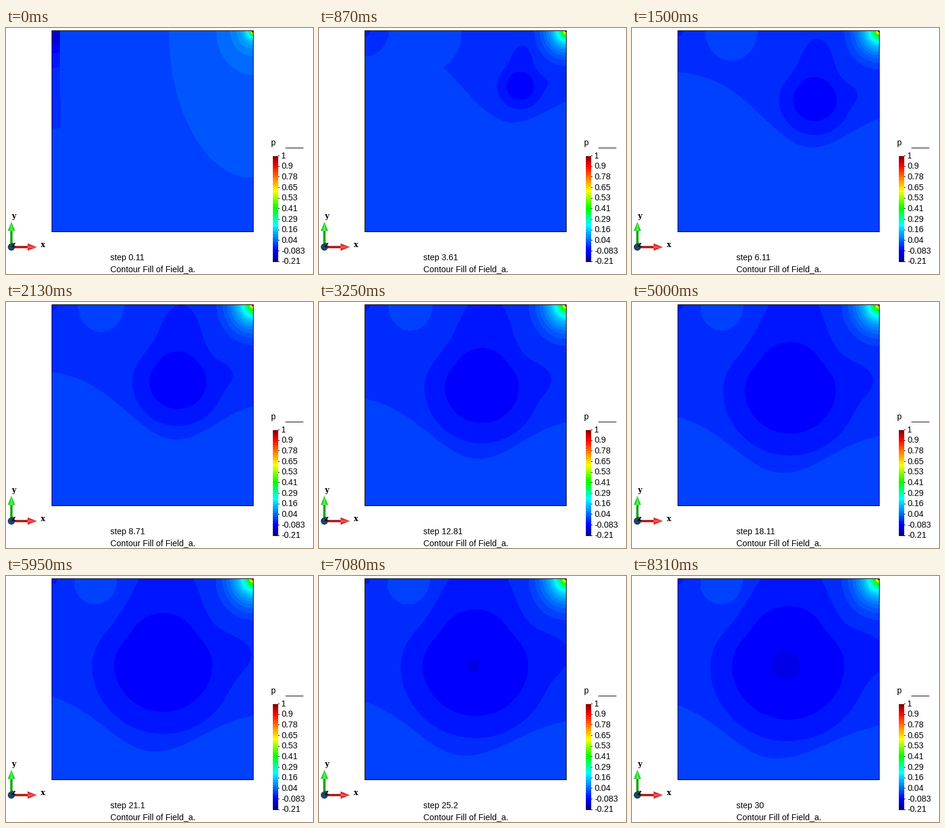
Animation of 512x411 px, one loop 8380 ms. Source, as a matplotlib script:

```python
import numpy as np
import matplotlib.pyplot as plt
from matplotlib.animation import FuncAnimation
from matplotlib.collections import PolyCollection
from matplotlib.patches import Circle, Polygon, Rectangle

W, H, DPI = 512, 411, 100
LOOP, TICK = 8380, 20
X0, Y0, X1, Y1 = 77, 5, 412, 340
BANDS, REST = 50, 8
PX = 72 / DPI

# palette: navy, blue, cyan, green, yellow, red, dark red
STOPS = [0, 5, 17, 25, 33, 45, 49]
COLORS = [(0, 0, .55), (0, 0, 1), (0, 1, 1), (0, 1, 0), (1, 1, 0), (1, 0, 0),
          (.55, 0, 0)]
PALETTE = np.column_stack([np.interp(range(BANDS), STOPS, c)
                           for c in zip(*COLORS)])


def output_index(ms):
    return int(np.interp(ms, [0, 870, 5070, 8310], [0, 13, 73, 121]) + 1e-6)


def sim_time(k):
    return float(np.interp(k, [0, 13, 31, 47, 58, 86, 121],
                           [0.11, 3.61, 8.71, 12.81, 15.11, 21.1, 30]))


def label(t):
    step = round((t - 0.11) * 10) / 10 + 0.11 if t < 20 else round(t, 1)
    return f"step {step:.4g}"


def relax(t, start, end, tau):
    return end + (start - end) * np.exp(-t / tau)


def bell(x, mid, width):
    return np.exp(-0.5 * ((x - mid) / width) ** 2)


ANGLE = np.linspace(-180, 180, 181)


def polar(x, y, rx, ry=None):
    """Closed curve; the angle runs clockwise from straight up."""
    a = np.radians(ANGLE)
    ry = rx if ry is None else ry
    return np.column_stack([x + rx * np.sin(a), y - ry * np.cos(a)])


def vortex(t, radius, chimney=0, wedge=0):
    """Round well with flattened shoulders, drawn to the lid and the wall."""
    x, y = relax(t, 418, 260, 4.9), relax(t, 30, 145, 4.2)
    dent = relax(t, 0, 0.14, 12)
    r = radius * (1 - dent * bell(abs(ANGLE), 52, 18)
                  + chimney * bell(ANGLE, 3, 15) + wedge * bell(ANGLE, 83, 11))
    return polar(x, y, r)


def basin(t):
    """Everything above a skewed bell curve that sinks with time."""
    x = np.linspace(X0 - 5, X1 + 5, 160)
    mid, peak = relax(t, 365, 235, 9), relax(t, 70, 310, 8)
    left = x < mid
    base = np.where(left, relax(t, -125, 205, 6.9), relax(t, 45, 250, 10))
    y = base + (peak - base) * bell(x, mid, np.where(left, 82, 55 + 1.1 * t))
    y = y * (1 - kick(t))
    return np.vstack([np.column_stack([x, y]), [(x[-1], -200), (x[0], -200)]])


def kick(t):
    """Weight of the initial impulse, 1 at the first output."""
    return np.exp(-(t - 0.11) / 0.35)


def corner(x, t, rank, reach, tall, settled):
    """Ring around a lid corner, fading from the impulse to its final size."""
    w = kick(t)
    start = reach * max(rank, 0.5) ** -1.2
    ratio = 1.1 + tall * np.exp(-2 * (rank - 1))
    return polar(x, Y0, settled ** (1 - w) * start ** w,
                 1.1 * settled ** (1 - w) * (start * ratio / 1.1) ** w)


def layers(t):
    """Filled bands from back to front as (polygon, band)."""
    pull = np.exp(-t / 2)
    out = [(basin(t), 7),
           (vortex(t, relax(t, 0, 140, 11.1), 0.75 - 0.012 * t,
                   0.18 + 0.004 * t), 6),
           (vortex(t, relax(t, 0, 110, 15.4)), 5),
           (polar(257, 150, 23.5 * np.sqrt(max(t - 24, 0) / 6)), 4),
           (polar(relax(t, 208, 148, 5), Y0, 36 + 150 * pull,
                  42 + 165 * pull), REST)]
    for rank in range(1, 6):
        size = 38 * np.exp(-1.6 * (rank - 1))
        out.append((corner(X0, t, rank, 125, 0.2, size), REST - rank))
    scale = relax(t, 0.5, 1, 3)
    for rank in range(BANDS - REST):
        size = 62 * scale * np.exp(-0.19 * rank ** 0.85)
        out.append((corner(X1, t, rank, 140, 0.65, size), REST + rank))
    return out


def pixel_axes(x0, y0, x1, y1):
    ax = fig.add_axes([x0 / W, 1 - y1 / H, (x1 - x0) / W, (y1 - y0) / H])
    ax.set(xlim=(x0, x1), ylim=(y1, y0))
    ax.axis("off")
    return ax


fig = plt.figure(figsize=(W / 100, H / 100), dpi=DPI, facecolor="white")
ax = pixel_axes(0, 0, W, H)
field = pixel_axes(X0, Y0, X1, Y1)


def text(x, y, s, size=14, **kw):
    kw = {"family": "Liberation Sans", "va": "baseline", **kw}
    return ax.text(x, y, s, fontsize=size * PX, **kw)


def box(x0, y0, x1, y1, color):
    ax.add_patch(Rectangle((x0, y0), x1 - x0, y1 - y0, fc=color, ec="none",
                           antialiased=False))


def arrow(dx, dy, dark, mid, light):
    """Shaded arrow from the triad origin along a unit direction."""
    o, d, n = np.array([9, 366]), np.array([dx, dy]), np.array([-dy, dx])

    def part(a, b, half, tip, color):
        pts = [o + a * d - half * n, o + a * d + half * n,
               o + b * d + tip * n, o + b * d - tip * n]
        ax.add_patch(Polygon(pts, fc=color, ec="none", zorder=2))

    part(0, 30, 2, 2, dark)
    part(27, 42.5, 6.2, 0, mid)
    part(27, 42.5, 2, 0, light)


box(X0 - 1, Y0 - 1, X1 + 1, Y1 + 1, "black")
box(X0, Y0, X1, Y1, PALETTE[REST])
bands = PolyCollection([], linewidths=0, antialiaseds=False)
field.add_collection(bands, autolim=False)

# legend
edges = np.linspace(391, 214, BANDS + 1)
for a, b, color in zip(edges, edges[1:], PALETTE):
    box(445, b, 454, a, color)
text(441, 195.5, "p")
box(466, 200, 496, 201, "black")
for i, v in enumerate("1 0.9 0.78 0.65 0.53 0.41 0.29 0.16 0.04 -0.083 -0.21"
                      .split()):
    y = 213 + 17.65 * i
    box(454, y, 456, y + 1, "black")
    text(459, y + 4.8, v)

# axis triad
arrow(0, -1, "#1fa81f", "#28d228", "#5cf05c")
arrow(1, 0, "#b52222", "#dc2c2c", "#f25a5a")
ax.add_patch(Circle((9, 366), 6, fc="#1c4664", ec="none", zorder=3))
for x, y, s in ((13, 318, "y"), (62, 366, "x"), (12.5, 366, "z")):
    text(x, y, s, 12.5, family="DejaVu Serif", weight="bold", ha="center",
         zorder=4)

caption = text(174, 388, "")
text(174, 407, "Contour Fill of Field_a.")

shown = {"k": None}


def draw(frame):
    k = output_index(frame * TICK + TICK / 2)
    if k != shown["k"]:
        shown["k"] = k
        t = sim_time(k)
        polys, idx = zip(*layers(t))
        bands.set_verts(polys)
        bands.set_facecolor(PALETTE[list(idx)])
        caption.set_text(label(t))
    return bands, caption


anim = FuncAnimation(fig, draw, frames=LOOP // TICK, interval=TICK,
                     repeat=True, repeat_delay=0, blit=False)
plt.show()
```
